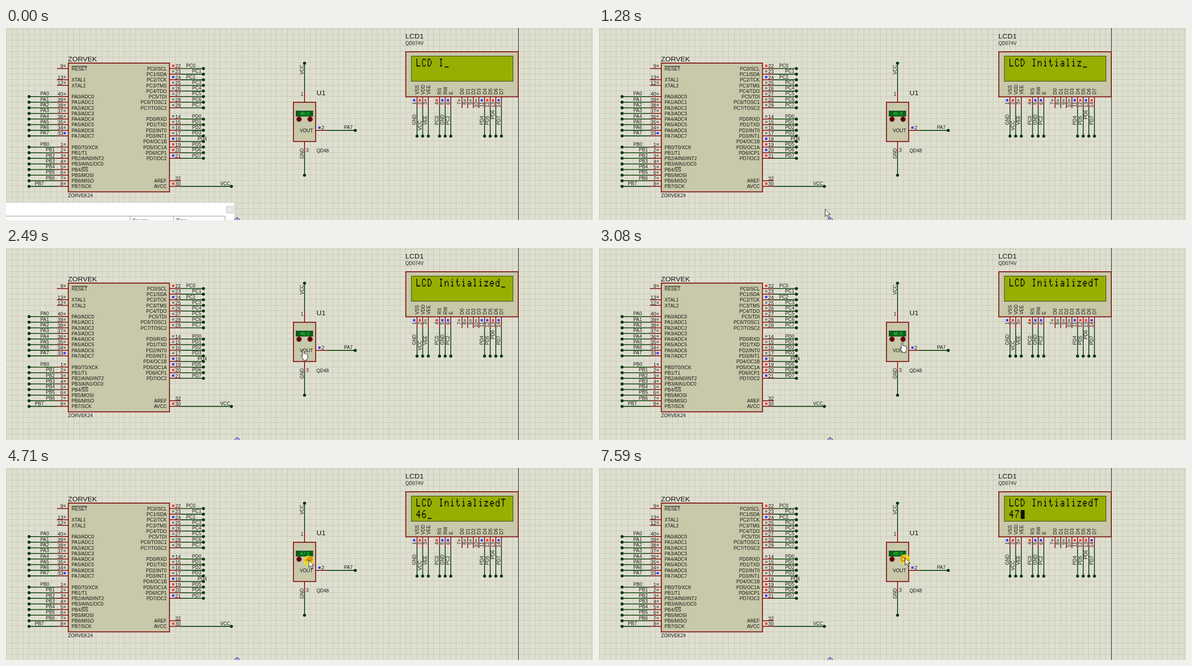
Animation of 1280 by 420 pixels, one loop 8 s. Source, as an HTML page:

```html
<!DOCTYPE html>
<html lang="en">
<head>
<meta charset="utf-8">
<title>Temperature sensor circuit</title>
<style>
html, body { margin: 0; width: 100%; height: 100%; overflow: hidden; background: #dfdfd0; }
svg { display: block; width: 1280px; height: 420px; font: 10.3px "Liberation Sans", Arial, sans-serif; fill: #141414; }
.big { font-size: 15.5px; }
.num { font-size: 10.8px; }
.end { text-anchor: end; }
.mid { text-anchor: middle; }
.grid { stroke: #c7c7b6; fill: none; }
.body { fill: #c8c8aa; stroke: #7e0d0d; stroke-width: 2; }
.pin { stroke: #7e0d0d; stroke-width: 1.8; }
.wire { stroke: #0a410a; stroke-width: 1.8; }
.dot { fill: #03350a; }
.over { stroke: #141414; }
</style>
</head>
<body>
<svg id="stage" viewBox="0 0 1280 420" role="img" aria-label="Circuit with microcontroller, sensor and display"></svg>
<script>
const LOOP = 8000;
const GRAY = '#8a8a80', RED = '#f23c3c', BLUE = '#3c3cf0';
const stage = document.getElementById('stage');
const out = [];
const $ = id => document.getElementById(id);

// Drawing helpers
const text = (x, y, s, cls = '') => out.push(`<text x="${x}" y="${y}" class="${cls}">${s}</text>`);
const up = (x, y, s, cls = '') =>
  out.push(`<text transform="translate(${x} ${y}) rotate(-90)" class="${cls}">${s}</text>`);
const line = (cls, x1, y1, x2, y2) =>
  out.push(`<line class="${cls}" x1="${x1}" y1="${y1}" x2="${x2}" y2="${y2}"/>`);
const box = (x, y, w, h, attrs) =>
  out.push(`<rect x="${x}" y="${y}" width="${w}" height="${h}" ${attrs}/>`);
const dot = (x, y) => out.push(`<circle class="dot" cx="${x}" cy="${y}" r="3.3"/>`);
const lamp = (x, y, color = GRAY, key = '') =>
  box(x - 2.5, y - 2.5, 5, 5, `fill="${color}"${key && ` data-net="${key}"`}`);

function drawGrid() {
  let d = '';
  for (let x = 50.3 % 12.265; x < 1280; x += 12.265) d += `M${Math.round(x) - .5} 0V420`;
  for (let y = 88.7 % 12.275; y < 420; y += 12.275) d += `M0 ${Math.round(y) - .5}H1280`;
  out.push(`<path class="grid" d="${d}"/>`);
  line('over" style="stroke:#10103c', 1117.5, 0, 1117.5, 420);
  out.push('<g fill="none" stroke="#2424b4" stroke-width="1.2"><circle cx="504" cy="420.5" r="5"/><path d="M504 413.5V420M497 420.5H511"/></g>');
}

const rowY = k => 88.7 + 12.275 * k;

function leftPin(k, num, name, net, netX, color) {
  const y = rowY(k);
  line('pin', 111, y, 135, y);
  text(143, y + 4, name);
  text(124.5, y - 1.6, num, 'num end');
  lamp(128, y - 6, color);
  if (!net) return;
  line('wire', 50, y, 111, y);
  dot(50.3, y);
  text(netX, y - 2.6, net);
}

function rightPin(k, num, name, net, netX, color, key) {
  const y = rowY(k), end = net === 'VCC' ? 491.5 : 430.5;
  line('pin', 357, y, 381, y);
  text(350.5, y + 4, name, 'end');
  text(369, y - 1.6, num, 'num');
  if (!net) return;
  lamp(364.5, y - 6, color, key);
  line('wire', 381, y, end, y);
  dot(end, y);
  text(netX, y - 2.6, net);
}

function drawChip() {
  box(135.8, 76.8, 220.7, 281.6, 'class="body"');
  text(135, 73, 'ZORVEK', 'big');
  text(135.5, 370, 'ZORVEK24');
  leftPin(0, 9, 'RESET');
  leftPin(2, 13, 'XTAL1');
  leftPin(3, 12, 'XTAL2');
  line('over', 143, 83.5, 177, 83.5);
  const pb = 'T0/XCK T1 AIN0/INT2 AIN1/OC0 SS MOSI MISO SCK'.split(' ');
  const pc = 'SCL SDA TCK TMS TDO TDI TOSC1 TOSC2'.split(' ');
  const pd = 'RXD TXD INT0 INT1 OC1B OC1A ICP1 OC2'.split(' ');
  for (let i = 0; i < 8; i++) {
    leftPin(5 + i, 40 - i, `PA${i}/ADC${i}`, `PA${i}`, 75, i === 7 ? BLUE : GRAY);
    leftPin(14 + i, 1 + i, `PB${i}/${pb[i]}`, `PB${i}`, i === 0 ? 75 : i === 7 ? 63 : 87);
    rightPin(i, 22 + i, `PC${i}/${pc[i]}`, `PC${i}`, i === 0 || i === 2 ? 393 : 406,
      i === 0 ? RED : i === 2 ? BLUE : GRAY, i === 0 ? 'RS' : '');
    rightPin(9 + i, 14 + i, `PD${i}/${pd[i]}`, `PD${i}`, i === 4 ? 418 : 406, GRAY, i > 3 ? 'D' + i : '');
  }
  line('over', 165, rowY(18) - 5, 179, rowY(18) - 5);
  rightPin(20, 32, 'AREF');
  rightPin(21, 30, 'AVCC', 'VCC', 467, RED);
}

function drawSensor() {
  line('wire', 651, 77, 651, 138);
  line('pin', 651, 138, 651, 162);
  line('pin', 651, 248, 651, 272);
  line('wire', 651, 272, 651, 322);
  line('pin', 675, 224, 700, 224);
  line('wire', 700, 224, 761, 224);
  dot(651, 77); dot(651, 322); dot(761.5, 224);
  box(626.8, 162.5, 48.5, 85.8, 'class="body"');
  text(677, 147, 'U1', 'big');
  text(677, 272, 'QD48');
  text(642.5, 148, '1', 'num');
  text(654, 271, '3', 'num');
  text(688, 222, '2', 'num');
  lamp(683.5, 218);
  out[out.length - 1] = out[out.length - 1].replace(GRAY, BLUE);
  text(737, 221, 'PA7');
  text(655, 228, 'VOUT', 'mid');
  up(648.5, 102, 'VCC');
  up(648.5, 286, 'GND');
  box(632.5, 181.5, 36.5, 11.5, 'fill="#08601c" stroke="#0c3a10"');
  out.push('<text id="temp" x="651.5" y="190.8" class="mid" style="font-size:10.6px" fill="#2fe83a"></text>');
  for (const x of [639, 663])
    out.push(`<circle id="knob${x}" cx="${x}" cy="199.5" r="5.2" fill="#7a0505" stroke="#4a0404"/>
      <path d="M${x} 196.8v5.2m-2-2.2l2 2.4l2-2.4" transform="${x > 650 ? 'rotate(180 663 199.4)' : ''}" fill="none" stroke="#3c0202" stroke-width="1.4"/>`);
}

function drawDisplay() {
  box(871.8, 52, 245.2, 98.5, 'class="body"');
  box(884, 61.5, 221.5, 55, 'fill="#98ae02" stroke="#26300a"');
  text(871, 23, 'LCD1', 'big');
  text(871, 37, 'QD074V');
  out.push('<path id="dots" fill="#0c1402"/>');
  const names = 'VSS VDD VEE - RS RW E - D0 D1 D2 D3 D4 D5 D6 D7'.split(' ');
  const nets = { VSS: 'GND', VDD: 'VCC', VEE: 'VEE', RS: 'PC0', RW: 'GND', E: 'PC2', D4: 'PD4', D5: 'PD5', D6: 'PD6', D7: 'PD7' };
  const colors = { VSS: BLUE, VDD: RED, RS: RED, RW: BLUE, E: BLUE };
  let num = 0;
  names.forEach((name, i) => {
    if (name === '-') return;
    const x = 896.3 + 12.27 * i, net = nets[name];
    line('pin', x, 151, x, 175);
    up(x + 4, 145.5, name);
    up(x - 2.4, 161.8, ++num, 'num end');
    lamp(x - 6.2, 158, colors[name], /RS|D[4-7]/.test(name) ? name : '');
    if (!net) return;
    line('wire', x, 175, x, 236);
    dot(x, 236.5);
    up(x - 2.6, net === 'VCC' ? 224 : net === 'PD6' ? 199.5 : 212, net);
  });
}

function drawWindow() {
  out.push('<g id="window">');
  box(0, 381, 499, 40, 'fill="#b9b9ae" opacity=".6"');
  box(0, 382, 498, 38, 'fill="#fefefe"');
  box(479, 389, 18, 17, 'id="close"');
  out.push('<path d="M485.5 395l5 5m0-5l-5 5" stroke="#fff" stroke-width="1.2"/><path d="M0 411.5H478M270.5 412V420M365.5 412V420M477.5 412V420" stroke="#8c8c8c"/>');
  text(276, 425, 'Source', 'num');
  text(371, 425, 'Time', 'num');
  out.push('</g>');
}

function drawPointers() {
  out.push(`<g id="press"><circle r="11.3" fill="#f6da14" opacity=".82"/></g>
    <circle id="hot" cx="663" cy="199.5" r="5.2" fill="#e09312" stroke="#c0780c"/>
    <path id="plus" stroke="#fbe66a" stroke-width="1.6" d="M662.8 196.3v6.4M659.6 199.5h6.4"/>
    <path id="aim" stroke="#6c6410" stroke-dasharray="1.5 1" d="M656 197v9M651.5 201.5h9"/>
    <g id="mouse" stroke="#111" stroke-linejoin="round" fill="#fff">
      <path data-kind="arrow" d="M.5 .5V16.5L4.2 13L6.8 19L9.4 18L6.8 12H11.6Z"/>
      <path data-kind="hand" d="M-1.6 14V2Q-1.6 .3 0 .3Q1.6 .3 1.6 2V8Q3.2 6.6 4.6 8.4Q6.2 7.3 7.4 9.2Q9.6 8.6 9.8 11V15Q9.8 18 8 19.5V22.5H.2V20Q-2 17.5-4.4 13.5Q-4.6 11.4-3.2 11.8Z"/>
      <path data-kind="pencil" d="M0 0L.8-4L5-12.5L7.6-11.2L3.3-2.8ZM.8-4L3.3-2.8M4-10.4L6.6-9"/>
    </g>`);
}

drawGrid();
drawChip();
drawSensor();
drawDisplay();
drawWindow();
drawPointers();
stage.innerHTML = out.join('');

// Dot characters as strokes: each pair is column and row
const GLYPHS = {
  L: '00 06 46', C: '41 30 10 01 05 16 36 45', D: '00 20 42 44 26 06 00',
  I: '10 30/20 26/16 36', n: '02 06/13 22 32 43 46', i: '20/12 22 26/16 36',
  t: '10 15 26 36 45/02 22', a: '12 32 43 46 16 05 14 44', l: '10 20 26/16 36',
  z: '02 42 06 46', e: '36 16 05 03 12 32 43 44 04', d: '40 46 16 05 03 12 22 33',
  T: '00 40/20 26', 4: '36 30 03 04 44', 6: '30 20 02 05 16 36 45 44 33 03', 7: '00 40 41 14 16'
};
const DOT_W = 1.7, DOT_H = 2.45;
const cell = (col, row) => [895 + 12.33 * col, 67 + 25 * row];
const block = (x, y, w, h) => `M${x.toFixed(2)} ${y.toFixed(2)}h${w}v${h}h${-w}z`;

function glyph(ch, col, row) {
  const [x, y] = cell(col, row), on = new Set();
  for (const stroke of (GLYPHS[ch] || '').split('/')) {
    const pts = stroke.split(' ').filter(Boolean).map(p => [+p[0], +p[1]]);
    pts.forEach((a, i) => {
      const b = pts[i + 1] || a;
      const n = Math.max(Math.abs(b[0] - a[0]), Math.abs(b[1] - a[1])) || 1;
      for (let k = 0; k <= n; k++)
        on.add(Math.round(a[0] + (b[0] - a[0]) * k / n) + ',' + Math.round(a[1] + (b[1] - a[1]) * k / n));
    });
  }
  return [...on].map(p => {
    const [c, r] = p.split(',');
    return block(x + c * DOT_W, y + r * DOT_H, DOT_W, DOT_H);
  }).join('');
}

// Display bus log: [time, state]
let state = { top: 'LCD I', low: '', col: 5, row: 0, nib: 6, rs: 1 };
const log = [[0, state]];
const put = (t, change) => log.push([t, state = { ...state, ...change }]);

function type(ch, high, low) {
  const code = ch.charCodeAt(0), { col, row } = state;
  const key = row ? 'low' : 'top';
  put(high, { nib: code >> 4, rs: 1 });
  const s = state[key];
  put(low, { nib: code & 15, col: col + 1, [key]: s.slice(0, col) + ch + s.slice(col + 1) });
}

function writeLow(t, gap, word, command) {
  command.forEach((nib, i) => put(t + i * gap, { nib, rs: 0 }));
  put(t + command.length * gap, { row: 1, col: 0 });
  [...word].forEach((ch, i) => {
    const at = t + (command.length + 2 * i) * gap;
    type(ch, at, at + gap);
  });
}

[450, 570, 690, 790, 890, 1010, 1120, 1240, 1350, 1460].forEach((t, i) => type('nitialized'[i], t - 50, t));
[...'Temperature'].forEach((ch, i) => type(ch, 2660 + 68 * i, 2694 + 68 * i));
writeLow(3530, 68, '46', [12, 0]);
writeLow(5110, 62, '47', [12, 0]);
writeLow(6760, 60, '47', [0]);

const BLINK = [[0, 0], [1850, 1], [2250, 0], [4390, 1], [4710, 0], [5420, 1], [6500, 0], [7590, 1]];
const TEMP = [[0, '46.0'], [4450, '47.0'], [7410, '48.0']];
const CLOSE = [[0, '#e2e2e2'], [330, '#f0c4c4'], [600, '#f0dcdc'], [780, '#e2e2e2'], [930, '#e87878']];
const KIND = [[0, ''], [150, 'arrow'], [1330, 'pencil'], [2400, 'hand'], [4030, 'arrow'], [5750, 'hand'], [6500, 'arrow']];
const PRESS = [[0, 0], [4450, 1], [5720, 0], [6130, 1], [6420, 0], [7260, 1]];
const PATH = [
  [150, 492, 420], [390, 484, 398], [690, 374, 392], [740, 376, 393], [970, 486, 397], [1220, 487, 397],
  [1460, 523, 389], [1850, 523, 389], [2640, 661, 206], [3200, 661, 206], [3390, 657, 196.5],
  [4010, 657, 196.5], [4030, 660, 201], [5720, 660, 201], [5850, 673, 201], [6420, 673, 201], [6580, 667, 196]
];

const last = (table, t) => {
  let found = table[0];
  for (const entry of table) if (entry[0] <= t) found = entry;
  return found[1];
};

function pointer(t) {
  const i = PATH.findIndex(p => p[0] > t);
  if (i === 0) return PATH[0].slice(1);
  if (i < 0) return PATH[PATH.length - 1].slice(1);
  const [t0, x0, y0] = PATH[i - 1], [t1, x1, y1] = PATH[i];
  const u = (t - t0) / (t1 - t0), e = u * u * (3 - 2 * u);
  return [x0 + (x1 - x0) * e, y0 + (y1 - y0) * e];
}

const show = (el, on) => { el.style.display = on ? '' : 'none'; };
const lamps = [...document.querySelectorAll('[data-net]')];
const kinds = [...document.querySelectorAll('[data-kind]')];

function drawDots(s, blink) {
  let d = '';
  [s.top, s.low].forEach((line, row) => [...line.slice(0, 16)].forEach((ch, col) => { d += glyph(ch, col, row); }));
  if (s.col < 16) {
    const [x, y] = cell(s.col, s.row), rows = blink ? 8 : 1;
    d += block(x, y + (8 - rows) * DOT_H, 5 * DOT_W, rows * DOT_H);
  }
  $('dots').setAttribute('d', d);
}

function render(t) {
  const s = last(log, t), press = last(PRESS, t), kind = last(KIND, t);
  const [x, y] = pointer(t);
  drawDots(s, last(BLINK, t));
  for (const el of lamps) {
    const net = el.dataset.net;
    const high = net === 'RS' ? s.rs : s.nib >> (net[1] - 4) & 1;
    el.setAttribute('fill', high ? RED : BLUE);
  }
  // The first eight outputs keep their idle colour until the bus drives them
  $('temp').textContent = last(TEMP, t);
  $('knob663').setAttribute('fill', t >= 5720 ? '#d01818' : '#7a0505');
  show($('window'), t < 1220);
  $('close').setAttribute('fill', last(CLOSE, t));
  for (const el of kinds) show(el, el.dataset.kind === kind);
  $('mouse').setAttribute('transform', `translate(${x} ${y})`);
  $('press').setAttribute('transform', t < 6000 ? 'translate(660 203)' : t < 7000 ? 'translate(672 201)' : 'translate(667.5 200)');
  show($('press'), press);
  show($('hot'), press);
  show($('plus'), press && t > 7000);
  show($('aim'), press && t < 6000);
}

const start = performance.now();
function frame(now) {
  render(Math.max(0, now - start) % LOOP);
  requestAnimationFrame(frame);
}
render(0);
requestAnimationFrame(frame);
</script>
</body>
</html>
```
